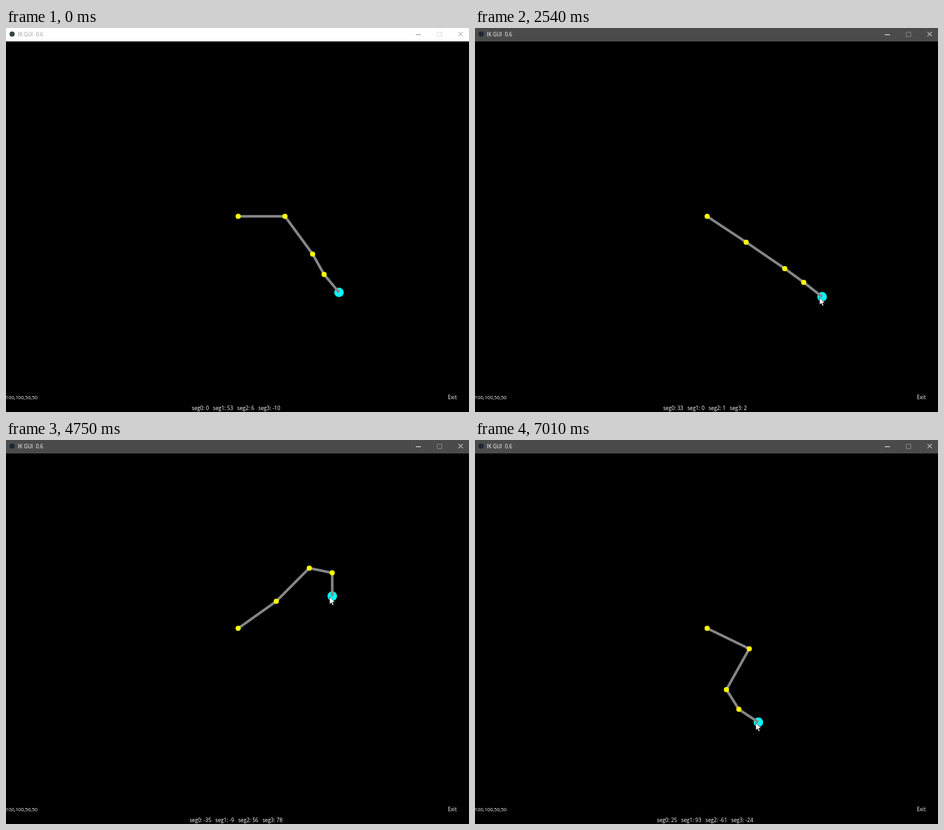
Animation, 722 px wide and 600 px high, one loop 7.05 s. Source, as an HTML page:

```html
<!DOCTYPE html>
<html lang="en">
<head>
<meta charset="utf-8">
<title>IK GUI</title>
<style>
  html, body { margin: 0; width: 100%; height: 100%; overflow: hidden; background: #000; }
  svg { display: block; }
  text { font: 8.2px "Open Sans", "Noto Sans", sans-serif; fill: #fff; white-space: pre; }
  #bar { --bar: #4b4b4b; --ink: #fff; --faint: #858585; --icon: #1c2630; }
  #bar.idle { --bar: #fff; --ink: #999; --faint: #ddd; --icon: #39463a; }
  #bar rect { fill: var(--bar); }
  #bar text { fill: var(--ink); }
  #bar path { fill: none; stroke: var(--ink); }
  #bar path.faint { stroke: var(--faint); }
  #bar circle { fill: var(--icon); }
</style>
</head>
<body>
<svg width="722" height="600" viewBox="0 0 722 600">
  <rect width="722" height="600"/>
  <g id="bar">
    <rect width="722" height="21"/>
    <circle cx="9.5" cy="9.5" r="4"/>
    <text x="18.5" y="13">IK GUI  0.6</text>
    <path d="M639 10.5h8"/>
    <path class="faint" d="M672.5 6.5h7v7h-7z"/>
    <path d="M705.5 6l7 7m0-7l-7 7"/>
  </g>
  <circle id="goal" r="7.4" fill="#0ff"/>
  <polyline id="arm" fill="none" stroke="#868686" stroke-width="4"/>
  <g id="joints" fill="#ff0"></g>
  <path id="cursor" d="M0 0V11.5L2.7 9.2L4.6 13.4L6.4 12.6L4.6 8.5H8.2Z"
        fill="#fff" stroke="#000" stroke-width=".6"/>
  <text x="-.4" y="579.5" style="font-size:7.7px">100,100,50,50</text>
  <text x="689" y="579.5">Exit</text>
  <text id="status" x="358.7" y="597" text-anchor="middle"></text>
</svg>
<script>
const LOOP = 7050, STEPS = 153, STEP = LOOP / STEPS;
const ENTER = 3, GRAB = 13;
const BASE = [362, 294.3];
const SCALE = 0.73;
const LENGTHS = [100, 100, 50, 50].map(length => length * SCALE);
const RAD = Math.PI / 180;

// Key poses of the drag: absolute segment angles in degrees
const poses = [
  { step: GRAB, angles: [0, 53.8, 60.6, 50.4] },
  { step: 38, angles: [43.9, 90.8, 141.4, 159.1] },
  { step: 55, angles: [33.6, 34.4, 36, 38.1] },
  { step: 75, angles: [-11.5, -73.2, -156.5, -187.7] },
  { step: 96, angles: [-20, -90, -50, 20] },
  { step: 103, angles: [-35.4, -45.2, 11.5, 90] },
  { step: 137, angles: [6.9, 93.3, -22, 139.3] },
  { step: 152, angles: [25.9, 119.2, 57.9, 33.5] }
];

const el = id => document.getElementById(id);
const lerp = (a, b, u) => a + (b - a) * u;
const wrap = deg => deg - 360 * Math.round(deg / 360);

const joints = LENGTHS.map(() => {
  const dot = document.createElementNS("http://www.w3.org/2000/svg", "circle");
  dot.setAttribute("r", 4);
  return el("joints").appendChild(dot);
});

function anglesAt(step) {
  const next = Math.max(1, poses.findIndex(pose => pose.step >= step));
  const a = poses[next - 1], b = poses[next];
  const u = Math.max(0, (step - a.step) / (b.step - a.step));
  return a.angles.map((angle, i) => lerp(angle, b.angles[i], u));
}

function chain(angles) {
  const points = [BASE];
  angles.forEach((deg, i) => {
    const [x, y] = points[i];
    points.push([x + LENGTHS[i] * Math.cos(deg * RAD), y + LENGTHS[i] * Math.sin(deg * RAD)]);
  });
  return points;
}

function label(angles) {
  const headings = angles.map(wrap);
  return headings
    .map((deg, i) => `seg${i}: ${Math.trunc(deg - (headings[i - 1] ?? 0))}`)
    .join("   ");
}

// The pointer comes in from the lower right and then holds the goal
function pointerAt(step, [x, y]) {
  const away = Math.max(0, (GRAB - step) / (GRAB - ENTER)) ** 2;
  return [lerp(x - 4, 645, away), lerp(y + 1, 555, away)];
}

function place(node, [x, y]) {
  node.setAttribute("cx", x);
  node.setAttribute("cy", y);
}

function draw(step) {
  const angles = anglesAt(step);
  const points = chain(angles);
  const goal = points[points.length - 1];
  el("bar").classList.toggle("idle", step < GRAB);
  place(el("goal"), goal);
  el("arm").setAttribute("points", points.join(" "));
  joints.forEach((dot, i) => place(dot, points[i]));
  el("cursor").setAttribute("transform", `translate(${pointerAt(step, goal)})`);
  el("cursor").style.display = step < ENTER ? "none" : "";
  el("status").textContent = label(angles);
}

const start = performance.now();
function tick() {
  const t = (performance.now() - start) % LOOP;
  draw(Math.min(STEPS - 1, Math.floor((t + 4) / STEP)));
  requestAnimationFrame(tick);
}
tick();
</script>
</body>
</html>
```
